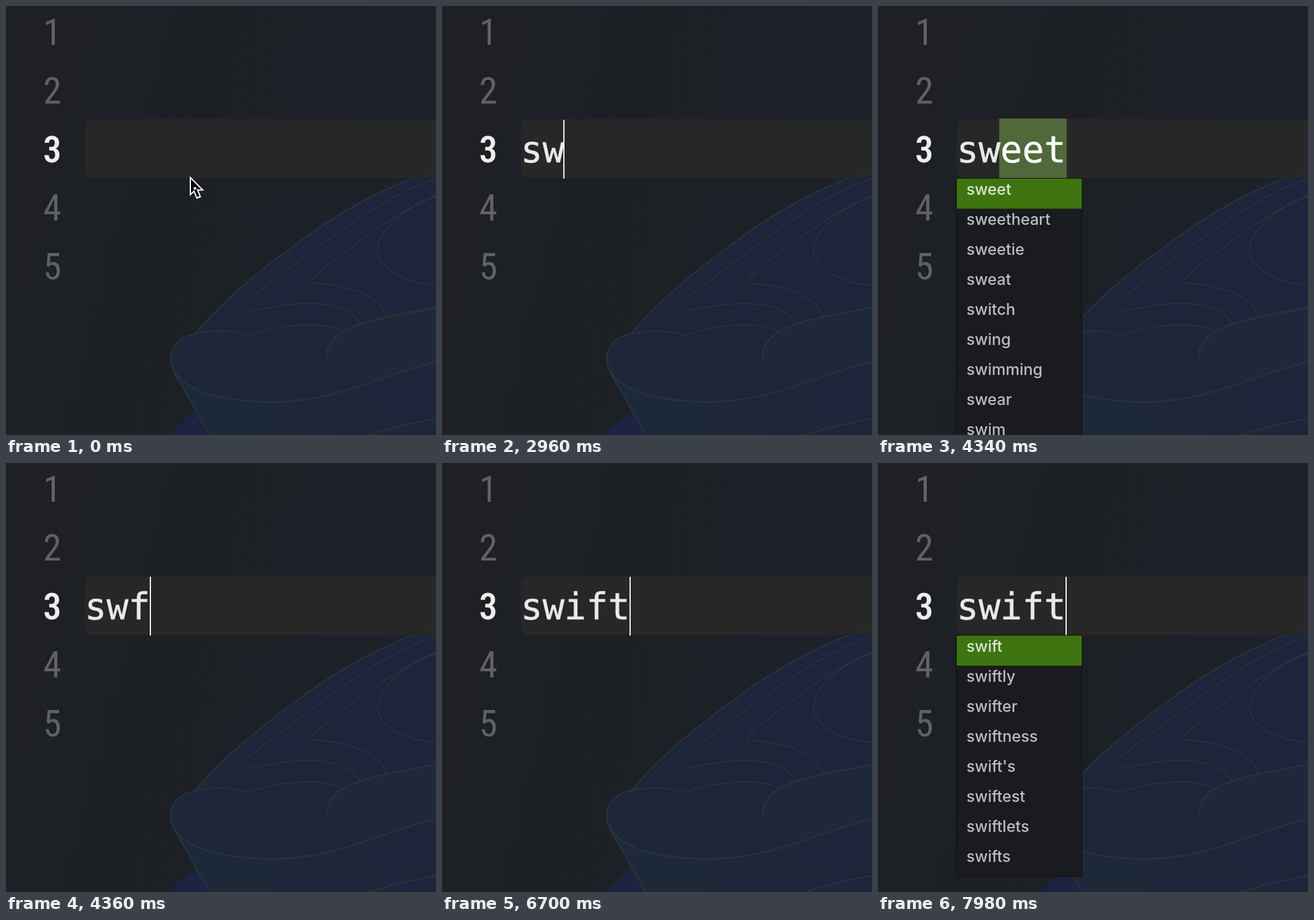
Animation of 688x686 px, one loop 8000 ms. Source, as an HTML page:

```html
<!DOCTYPE html>
<html lang="en">
<head>
<meta charset="utf-8">
<title>Word completion</title>
<style>
  html, body { margin: 0; width: 100%; height: 100%; overflow: hidden; background: #1d2024; }
  svg { display: block; width: 688px; height: 686px; }
  text { white-space: pre; }
  .numbers { font: 400 59px "Roboto Condensed", "Open Sans Condensed", Roboto, sans-serif; text-anchor: middle; fill: #606265; }
  .numbers .current { font-weight: 500; fill: #eee; }
  .code { font: 58px "DejaVu Sans Mono", monospace; fill: #e9e9e9; stroke: #e9e9e9; stroke-width: 0.6; }
  .menu { font: 500 25px Inter, sans-serif; fill: #bcbdbf; }
  .menu text:first-of-type { fill: #dce5d3; }
  .folds { fill: none; stroke: #28363b; stroke-width: 2; }
</style>
</head>
<body>
<svg viewBox="0 0 688 686">
  <defs>
    <linearGradient id="room" x2="1" y2="0.25">
      <stop offset="0" stop-color="#1f2024"/>
      <stop offset="0.4" stop-color="#1c2024"/>
      <stop offset="1" stop-color="#1d2129"/>
    </linearGradient>
    <linearGradient id="cloth" x1="0" y1="1" x2="0.6" y2="0.3">
      <stop offset="0" stop-color="#1d2a39"/>
      <stop offset="0.5" stop-color="#1d2639"/>
      <stop offset="1" stop-color="#1d243b"/>
    </linearGradient>
    <linearGradient id="lip">
      <stop offset="0" stop-color="#1d2739"/>
      <stop offset="1" stop-color="#1e2439"/>
    </linearGradient>
  </defs>
  <rect width="688" height="686" fill="url(#room)"/>

  <!-- dim backdrop -->
  <path fill="#1c2340" d="M258 686Q284 663 306 647L330 686Z"/>
  <path fill="url(#cloth)" d="M688 262C600 290 520 338 460 384C395 431 340 478 303 524C272 530 262 550 264 568C267 592 284 606 300 641L326 686H688Z"/>
  <path fill="url(#lip)" d="M303 524C272 530 262 550 264 568C270 610 330 632 425 633C480 633 520 618 560 606C510 590 505 540 540 521C510 505 430 510 390 527Z"/>
  <path fill="#1e283a" d="M512 566C512 530 540 512 610 497L688 482V569C640 580 600 594 560 606C530 600 512 585 512 566Z"/>
  <g class="folds">
    <path d="M688 262C600 290 520 338 460 384C395 431 340 478 303 524C272 530 262 550 264 568C270 610 330 632 425 633C530 633 600 590 688 569"/>
    <path stroke-width="1.5" d="M688 276C600 305 500 384 385 472M688 303C630 325 560 380 520 410C500 425 486 439 490 443C540 446 595 458 610 497M688 305C640 320 595 360 594 392C600 425 640 442 688 447M390 488C440 478 540 458 568 510M303 524Q350 514 390 527C430 510 510 502 540 521"/>
    <path d="M512 566C512 530 540 512 610 497L688 482M580 686Q640 668 688 660M264 568C267 592 284 606 300 641L326 686"/>
  </g>

  <rect x="126" y="181" width="600" height="94" rx="12" fill="#282828" opacity="0.96"/>
  <g class="numbers" id="numbers"></g>

  <rect id="selection" x="194" y="180" width="108" height="95" fill="#50683a"/>
  <text class="code" x="126" y="250"><tspan id="typed"></tspan><tspan id="ghost" fill="#fff"></tspan></text>
  <rect id="caret" y="182" width="2" height="94" fill="#f0f0f0"/>
  <g class="menu" id="menu"></g>
  <g id="pointer" transform="translate(294 272)">
    <path fill="#fff" d="M0 0L23.2 23.2H9.6L8.8 23.4L0 32ZM9 11.2L18.2 33.4L11 36.4L1.6 14.2Z"/>
    <path fill="#000" d="M2 4.8V27.2L8 21.4L8.8 21.2H18.4ZM5.7 18.8L9.4 17.3L15.5 32L11.8 33.6Z"/>
  </g>
</svg>
<script>
const $ = id => document.getElementById(id);
const LOOP = 8000, ADVANCE = 34.92, ROW = 48;

const keys = [
  [0, ""], [2640, "s"], [2940, "sw"], [4360, "swf"],
  [6140, "sw"], [6220, "swi"], [6300, "swif"], [6580, "swift"]
];
const caretOff = [[0, 160], [1800, 2640], [3760, 4360], [6000, 6140]];
const menus = [
  { from: 3760, to: 4360, height: 480,
    words: "sweet sweetheart sweetie sweat switch swing swimming swear swim" },
  { from: 7400, to: LOOP, height: 386,
    words: "swift swiftly swifter swiftness swift's swiftest swiftlets swifts" }
];

const within = (t, from, to) => t >= from && t < to;
const show = (id, on) => $(id).setAttribute("visibility", on ? "visible" : "hidden");

$("numbers").innerHTML = [1, 2, 3, 4, 5].map(n =>
  `<text x="74" y="${62 + (n - 1) * 93.75}"${n === 3 ? ' class="current"' : ""}>${n}</text>`).join("");

for (const menu of menus) {
  menu.html = `<rect x="125.5" y="275.5" width="201" height="${menu.height}" fill="#1a1b1f" stroke="#0d0e10"/>
    <rect x="126" y="276" width="200" height="${ROW}" fill="#3e740f"/>` +
    menu.words.split(" ").map((word, i) => `<text x="141.5" y="${302 + i * ROW}">${word}</text>`).join("");
}

let shown;
function draw(t) {
  const typed = keys.filter(([start]) => start <= t).pop()[1];
  $("typed").textContent = typed;

  const completing = within(t, 3760, 4360);
  $("ghost").textContent = completing ? "eet" : "";
  show("selection", completing);

  // the caret snaps to even pixels
  $("caret").setAttribute("x", 2 * Math.floor((126 + typed.length * ADVANCE) / 2));
  show("caret", !caretOff.some(([from, to]) => within(t, from, to)));
  show("pointer", t < 2640);

  const menu = menus.find(m => within(t, m.from, m.to));
  if (menu !== shown) {
    $("menu").innerHTML = menu ? menu.html : "";
    shown = menu;
  }
  if (menu) $("menu").setAttribute("opacity", Math.min(1, (t - menu.from + 20) / 240));
}

const begin = performance.now();
function tick() {
  draw((performance.now() - begin) % LOOP);
  requestAnimationFrame(tick);
}
tick();
</script>
</body>
</html>
```
